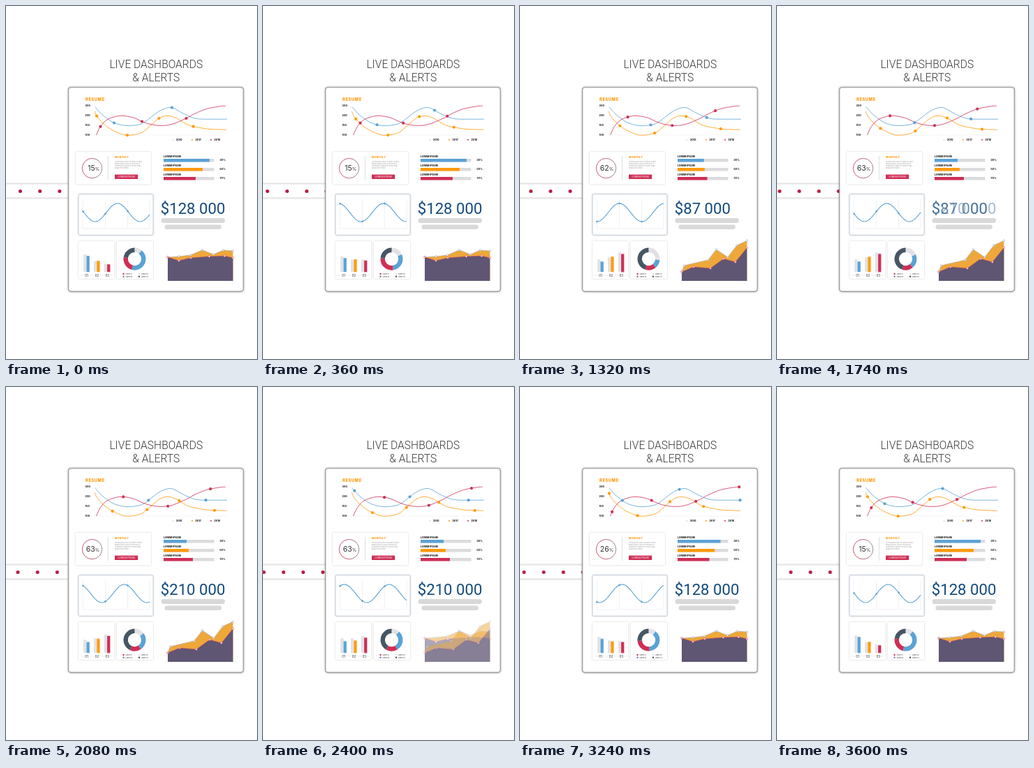
Recreate the animation shown at these times as an HTML page. Size 360 px wide and 506 px high, loop 3.62 s.

```html
<!DOCTYPE html>
<html lang="en">
<head>
<meta charset="utf-8">
<title>Live dashboards</title>
<style>
  :root { --T: 3620ms; --blue: #5aa2d6; --orange: #ff9a0a; --red: #cf2f55; --slate: #465664; --grey: #dcdcdf; }
  html, body { margin: 0; width: 100%; height: 100%; overflow: hidden; background: #fff; }
  svg { display: block; width: 360px; height: 506px; }
  text { font-family: Inter, Roboto, sans-serif; }
  .title { font: 300 15.6px Roboto, sans-serif; fill: #3a3a3e; text-anchor: middle; }
  .bold { font-weight: 800; font-size: 3.6px; fill: #222; }
  .tiny { font-size: 2.35px; fill: #999; }
  .money { font: 400 22.2px Roboto, sans-serif; fill: #134a7c; }
  .card { fill: #fff; filter: drop-shadow(0 .6px .9px #0003); }
  .line { fill: none; stroke-width: .8; }
  .flow { animation: flow calc(var(--T) / 5) linear infinite; }
  .gauge, .col, .fade { animation: var(--T) ease-in-out infinite; }
  .gauge { animation-name: gauge; transform-box: fill-box; transform-origin: left; }
  .col { animation-name: col; transform-box: fill-box; transform-origin: bottom; }
  .m1 { animation-name: m1; }
  .m2 { animation-name: m2; }
  .m3 { animation-name: m3; }
  .a1 { animation-name: a1; }
  .a2 { animation-name: a2; }
  @keyframes flow { to { transform: translateX(28.2px); } }
  @keyframes gauge {
    0%, 8.8%, 97.8%, 100% { transform: none; }
    46.4%, 65.2% { transform: scaleX(var(--lo)); }
  }
  @keyframes col {
    0%, 4%, 97%, 100% { transform: none; }
    18%, 50% { transform: scaleY(var(--b)); }
    68%, 81% { transform: scaleY(var(--c)); }
  }
  @keyframes m1 { 0%, 15.2% { opacity: 1; } 22.9%, 78.4% { opacity: 0; } 86.2%, 100% { opacity: 1; } }
  @keyframes m2 { 0%, 15.2% { opacity: 0; } 22.9%, 44.8% { opacity: 1; } 52.5%, 100% { opacity: 0; } }
  @keyframes m3 { 0%, 44.8% { opacity: 0; } 52.5%, 78.4% { opacity: 1; } 86.2%, 100% { opacity: 0; } }
  @keyframes a1 { 0%, 11.6% { opacity: 1; } 19.9%, 62.1% { opacity: 0; } 70.4%, 100% { opacity: 1; } }
  @keyframes a2 { 0%, 11.6% { opacity: 0; } 19.9%, 62.1% { opacity: 1; } 70.4%, 100% { opacity: 0; } }
</style>
</head>
<body>
<svg id="stage" viewBox="0 0 360 506">
  <defs>
    <linearGradient id="ringTone"><stop offset=".2" stop-color="#d0566f"/><stop offset="1" stop-color="#98898e"/></linearGradient>
  </defs>
  <text class="title" x="215.3" y="89">LIVE DASHBOARDS</text>
  <text class="title" x="215.3" y="107.5">&amp; ALERTS</text>

  <rect x="-5" y="255" width="110" height="20" fill="#fff" stroke="#d9d9dc" stroke-width=".8" style="filter:drop-shadow(0 .5px 1px #0003)"/>
  <g class="flow" id="flow" fill="#b9173f"></g>

  <rect x="89.7" y="116.7" width="250.6" height="292.4" rx="3.5" fill="#fff" stroke="#96969a" stroke-width="1.1" style="filter:drop-shadow(0 .8px 1.4px #0006)"/>

  <text x="114" y="135.6" font-size="5.8" font-weight="800" letter-spacing=".55" fill="#ff9a0a">RESUME</text>
  <path d="M122 185H317" stroke="#ddd" stroke-width=".6" stroke-dasharray="1 1.2"/>
  <g id="axis"></g>
  <g id="curves"></g>

  <rect class="card" x="100" y="209" width="108" height="46.5" rx="1"/>
  <circle cx="123.5" cy="232.6" r="14.2" fill="none" stroke="url(#ringTone)" stroke-width="1"/>
  <text x="127.8" y="236.4" font-size="10.6" fill="#333" text-anchor="end" id="count">15</text>
  <text x="127.8" y="236.4" font-size="6.6" fill="#333">%</text>
  <path d="M146.5 215V249" stroke="#d5d8e2" stroke-width=".8"/>
  <text class="bold" x="156" y="217.6" letter-spacing=".25" style="fill:#ff9a0a">MONTHLY</text>
  <g class="tiny">
    <text x="156" y="223.8">Lorem ipsum dolor sit amet consect</text>
    <text x="156" y="227">adipiscing elit sed do eiusmod te</text>
    <text x="156" y="230.2">incididunt ut labore et dolore mag</text>
    <text x="156" y="233.4">aliqua enim minim</text>
  </g>
  <rect x="156" y="241.6" width="33.2" height="6.4" fill="#cf2f55"/>
  <text x="172.6" y="246.1" font-size="3.5" fill="#fff" text-anchor="middle">LOREM IPSUM</text>

  <g id="gauges"></g>

  <rect class="card" x="104" y="269.8" width="107" height="58.4" rx="1.5" stroke="#b9c6d8" stroke-width=".8"/>
  <path d="M110 277V319M142.5 277V319M174.5 277V319M206 277V319M110 319H206" fill="none" stroke="#e6e8ee" stroke-width=".6"/>
  <path id="wave" class="line" stroke="#5aa2d6" style="stroke-width:1.1"/>
  <g id="waveDots" fill="#5aa2d6"></g>

  <text class="money fade m1" x="221.7" y="297.6">$128 000</text>
  <text class="money fade m2" x="221.7" y="297.6">$87 000</text>
  <text class="money fade m3" x="221.7" y="297.6">$210 000</text>
  <rect x="222.5" y="304" width="91.5" height="7" rx="3.5" fill="#d9d9da"/>
  <rect x="227.5" y="313.5" width="81.5" height="6.6" rx="3.3" fill="#d9d9da"/>

  <rect class="card" x="104" y="337" width="51.5" height="54" rx="1"/>
  <g id="cols"></g>

  <rect class="card" x="159" y="337" width="52" height="54" rx="1"/>
  <g id="donut" fill="none" stroke-width="6.4"></g>
  <g id="legend"></g>

  <g id="areas"></g>
</svg>
<script>
const T = 3620, BLUE = '#5aa2d6', ORANGE = '#ff9a0a', RED = '#cf2f55', SLATE = '#465664', GREY = '#e2e2e6';
const $ = id => document.getElementById(id);

function add(parent, tag, attrs, text) {
  const el = document.createElementNS('http://www.w3.org/2000/svg', tag);
  for (const k in attrs) el.setAttribute(k, attrs[k]);
  if (text) el.textContent = text;
  $(parent).appendChild(el);
  return el;
}
const dot = (parent, cx, cy, r, fill) => add(parent, 'circle', { cx, cy, r, fill });
const label = (parent, cls, x, y, text) => add(parent, 'text', { class: cls, x, y }, text);
const pairs = s => s.split(' ').map(p => p.split(',').map(Number));

// Catmull-Rom spline through the points
function spline(p) {
  let d = 'M' + p[0];
  for (let i = 0; i < p.length - 1; i++) {
    const a = p[i - 1] || p[i], b = p[i], c = p[i + 1], e = p[i + 2] || c;
    d += `C${b[0] + (c[0] - a[0]) / 6},${b[1] + (c[1] - a[1]) / 6} ${c[0] - (e[0] - b[0]) / 6},${c[1] - (e[1] - b[1]) / 6} ${c}`;
  }
  return d;
}

for (let i = -1; i < 4; i++) add('flow', 'circle', { cx: 20.5 + 28.2 * i, cy: 265.5, r: 2.5 });

// Line chart
['300', '200', '150', '100'].forEach((s, i) => label('axis', 'bold', 113.6, 143.7 + 14.2 * i, s));
[[239.5, '#d5dce6'], [267, ORANGE], [294, RED]].forEach(([x, c], i) => {
  dot('axis', x, 191.7, 1, c);
  label('axis', 'bold', x + 4.4, 193, 2016 + i);
});

// Points, then the x of two neighbouring dots at the start of the loop
const runners = [
  [BLUE, '128,144.5 131.5,149 140,157.5 155,167.5 172,171.5 188,170.4 198,167 211,157 221,150 233,145.6 241,146.8 254,154 268,160 278.5,162 295,162.2 317,162.2', 155, 238],
  [ORANGE, '127.5,151 130,157.5 137,166 148.5,175.5 164,183 176,185.2 193.5,182 206,172.5 219.5,161 231,157.4 244,160.5 258,169 268,172.5 287.5,176 303,177 316,177.3', 174, 219.5],
  [RED, '129.5,185 135,173.5 143.5,164 154,159.3 166,157.3 182.5,160 195,165.5 207,169.5 222,171.4 238,169.5 258.5,161 269.5,155 287.5,147.5 308.5,143.6 315,143.4', 195, 258.5]
].map(([color, pts, x0, x1]) => {
  const path = add('curves', 'path', { class: 'line', stroke: color, d: spline(pairs(pts)) });
  const len = path.getTotalLength();
  const at = x => {
    let lo = 0, hi = len;
    for (let i = 0; i < 20; i++) {
      const mid = (lo + hi) / 2;
      if (path.getPointAtLength(mid).x < x) lo = mid; else hi = mid;
    }
    return lo;
  };
  return { path, len, color, from: at(x0), step: at(x1) - at(x0) };
});
for (const r of runners) r.dots = [-2, -1, 0, 1, 2].map(k => ({ k, el: dot('curves', 0, 0, 2.1, r.color) }));

// Gauges: full and short widths
[[BLUE, 66, 33, '20%'], [ORANGE, 56, 36, '50%'], [RED, 46, 42, '70%']].forEach(([fill, w, lo, pct], i) => {
  const y = 219 + 13 * i;
  label('gauges', 'bold', 225.8, y - 2, 'LOREM IPSUM');
  add('gauges', 'rect', { x: 226, y, width: 72.5, height: 4.5, fill: '#dcdcdf' });
  add('gauges', 'rect', { class: 'gauge', x: 226, y, width: w, height: 4.5, fill, style: `--lo:${lo / w}` });
  label('gauges', 'bold', 306.5, y + 3.4, pct);
});

// Columns: three heights for the grey and the coloured bar
[[BLUE, [25, 18, 21], [23, 15, 17]], [ORANGE, [15.5, 21, 21], [16, 22, 18]], [RED, [12, 28, 24], [11, 26, 22]]].forEach(([fill, g, h], i) => {
  const x = 111.2 + 14.8 * i;
  [[x, g, GREY], [x + 4.3, h, fill]].forEach(([x, [a, b, c], fill]) =>
    add('cols', 'rect', { class: 'col', x, y: 381.3 - a, width: 4.3, height: a, fill, style: `--b:${b / a};--c:${c / a}` }));
  add('cols', 'text', { x: x + 4.4, y: 387.6, 'font-size': 4.4, fill: '#222', 'text-anchor': 'middle' }, '0' + (i + 1));
  add('cols', 'path', { d: `M${x + 8.2} 386h${i < 2 ? 7.2 : 4}`, stroke: '#ccc', 'stroke-width': .4 });
});
add('cols', 'path', { d: 'M107 386h5', stroke: '#ccc', 'stroke-width': .4 });

// Donut
const slices = [GREY, BLUE, RED, SLATE].map(stroke => add('donut', 'path', { stroke }));
[[168.5, 384, RED], [191, 384, GREY], [168.5, 387.8, '#7a7bb0'], [191, 387.8, SLATE]].forEach(([x, y, c], i) => {
  dot('legend', x, y, 1.2, c);
  add('legend', 'text', { x: x + 3, y: y + 1, 'font-size': 2.4, fill: '#333' }, 'Label 0' + (i + 1));
});
const arc = (a, b) => {
  const p = h => {
    const q = h * Math.PI / 6;
    return `${184.5 + 12.8 * Math.sin(q)},${362.6 - 12.8 * Math.cos(q)}`;
  };
  return `M${p(a)}A12.8 12.8 0 ${b - a > 6 ? 1 : 0} 1 ${p(b)}`;
};

// Area charts
[['a1', '232,360 248,359 264.5,357 281.5,349.7 297.5,356 311.5,350 325.5,351', '232,360 248,365 265,361 291.5,359 313.5,358.3 325.5,361'],
 ['a2', '232,381 235.5,372 270,364 281.5,349 298,360 311,343 325.5,336.3', '232,381 249,374 273,376 292,362.3 309,367 325.5,346.5']].forEach(([cls, back, front]) => {
  const g = add('areas', 'g', { class: 'fade ' + cls, id: cls });
  [[back, '#eea83a', '#9aa3b0'], [front, '#5f5673', '#d8455f']].forEach(([pts, fill, edge]) => {
    add(g.id, 'path', { d: `M232 394L${pts}V394Z`, fill });
    add(g.id, 'polyline', { points: pts, fill: 'none', stroke: edge, 'stroke-width': .5 });
    pairs(pts).forEach(([cx, cy]) => add(g.id, 'circle', { cx, cy, r: 1.3, fill: '#fff', stroke: edge, 'stroke-width': .6 }));
  });
});

const waveDots = [110.5, 142.5, 174.5].map(x => dot('waveDots', x, 0, 1.3, BLUE));

const smooth = (t, a, b) => {
  const p = Math.min(1, Math.max(0, (t - a) / (b - a)));
  return p * p * (3 - 2 * p);
};
const times = [0, 700, 1320, 1740, 2400, 2880, T];
const edges = [
  [1.3, 3, 3.2, 2.2, 1.4, 1.3, 1.3],
  [6.5, 5, 4.7, 4.7, 5, 5.2, 6.5],
  [9.3, 9, 6.6, 6.6, 7, 8.4, 9.3]
];
const track = (v, t) => {
  const i = Math.max(0, times.findIndex(x => x > t) - 1);
  return v[i] + (v[i + 1] - v[i]) * (t - times[i]) / (times[i + 1] - times[i]);
};

function draw(t) {
  for (const r of runners) for (const { k, el } of r.dots) {
    const s = r.from + r.step * (t / T + k), on = s >= 0 && s <= r.len;
    el.style.display = on ? '' : 'none';
    if (!on) continue;
    const p = r.path.getPointAtLength(s);
    el.setAttribute('cx', p.x);
    el.setAttribute('cy', p.y);
  }

  const e = smooth(t, 330, 1400) - smooth(t, 2490, 3580);
  $('count').textContent = Math.round(15 + 48 * e);

  const peak = 160 + 129 * t / T;
  const wave = x => 296 - 13 * Math.cos((x - peak) * 2 * Math.PI / 64.5);
  let d = '';
  for (let x = 110; x <= 206; x++) d += `${d ? 'L' : 'M'}${x} ${wave(x).toFixed(2)}`;
  $('wave').setAttribute('d', d);
  for (const c of waveDots) c.setAttribute('cy', wave(+c.getAttribute('cx')));

  const cuts = [0, ...edges.map(v => track(v, t)), 12];
  slices.forEach((s, i) => s.setAttribute('d', arc(cuts[i], cuts[i + 1])));
}

let start;
function tick(now) {
  start ??= now;
  draw((now - start) % T);
  requestAnimationFrame(tick);
}
draw(0);
requestAnimationFrame(tick);
</script>
</body>
</html>
```
